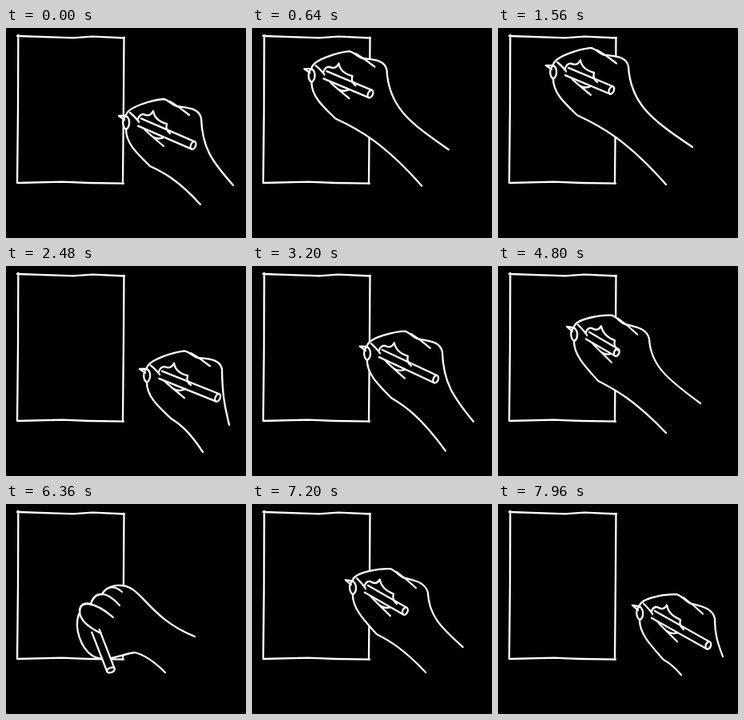
Write an HTML page that moves like this. It is 300 px wide and 263 px high and loops after 8000 ms.

```html
<!DOCTYPE html>
<html lang="en">
<head>
<meta charset="utf-8">
<title>Drawing hand</title>
<style>
html, body { margin: 0; width: 100%; height: 100%; overflow: hidden; background: #000; }
svg { display: block; width: 100%; height: 100%; }
path { fill: none; stroke: #fff; stroke-width: 2.3; stroke-linecap: round; stroke-linejoin: round; }
.solid { fill: #000; }
.mask { fill: #000; stroke: none; }
</style>
</head>
<body>
<svg viewBox="0 0 300 263">
  <path d="M14 10L84 12.3 108 10.7 148 12.5M147.5 12L147 90 146 195M14 194L70 192.7 104 194 147 194.7M15.3 9L15 100 14 194"/>
  <g id="hand"></g>
</svg>
<script>
const LOOP = 8000, STEP = 40;

// Where the nib is, how the hand leans, how far the pen shows, where the arm is cut
const pose = (x, y, lean, reach, top, low, shake = [2, 1, 160], fist = false) =>
  ({ x, y, lean, reach, top, low, shake, fist });

const start = pose(141, 110, 0, 1, [143, 87], [102, 111]);
const sketch = pose(60, 47, -0.02, 0.88, [183, 102], [150, 149], [3, 1, 160]);
const hover = pose(167, 129, -0.03, 1.05, [112, 70], [79, 104]);
const shade = pose(83, 55, 0.14, 0.97, [190, 133], [152, 174], [-4, 1, 160]);
const tilt = pose(86, 76, 0.12, 0.67, [167, 96], [124, 133]);
const grip = pose(92, 137, 0, 1, [144, 29], [107, 74], [-4, -48, 640], true);
const rest = pose(168, 127, 0.13, 1.02, [113, 64], [61, 87]);

// Each pose is held, with a shake, from one time to another
const holds = [
  [0, 0, start], [760, 1400, sketch], [1560, 1560, sketch], [2160, 2480, hover],
  [2880, 2880, hover], [3640, 4120, shade], [4480, 4800, tilt], [5080, 6520, grip],
  [6840, 7000, tilt], [7480, LOOP, rest]
];

const svgNS = 'http://www.w3.org/2000/svg';
const hand = document.getElementById('hand');
const layers = ['mask', 'line', 'line', 'mask', 'line', 'solid', 'line', 'line', 'solid'].map(kind => {
  const path = document.createElementNS(svgNS, 'path');
  path.setAttribute('class', kind);
  return hand.appendChild(path);
});

const mix = (a, b, k) => Array.isArray(a) ? a.map((v, i) => mix(v, b[i], k)) : a + (b - a) * k;
const bezier = ([first, ...rest]) => `M${first}C${rest.join(' ')}`;

function between(from, to, kx, ky) {
  return [mix(from[0], to[0], kx), mix(from[1], to[1], ky)];
}

function openHand({ lean, reach, top, low }) {
  const [end, cut] = [top, low].map(([x, y]) => [x, y - lean * x]);
  const heel = [39, 63], back = [103, 3];
  return {
    over: [[9, -1], [12, -12], [44, -20], [56, -21], [62, -20], [66, -14], [72, -12],
      [86, -10], [100, -10], back, between(back, end, 0.03, 0.45), between(back, end, 0.35, 0.65), end],
    under: [[9, 17], [9, 35], [24, 48], heel,
      between(heel, cut, 0.25, 0.15), between(heel, cut, 0.55, 0.35), cut],
    pen: [[26, 8], [93 * reach, 37 * reach]],
    thumb: 'M14 -4C24 4 28 12 34 19Q42 26 56 38M42 26Q50 31 58 26',
    creases: 'M64 -18Q76 -11 88 -1M24 4Q26 -2 31 -2Q39 2 43 -6Q45 6 60 10Q58 18 64 22',
    tip: 'M9 0c6 4 5 14 0 17c-5 -4 -5 -13 0 -17L0 0L7 5'
  };
}

function closedHand({ top, low }) {
  return {
    over: [[0, 0], [0, -12], [6, -14], [14, -12], [18, -24], [24, -24], [28, -24],
      [33, -33], [44, -36], [52, -35], [78, -34], [85, 5], top],
    under: [[-1, 1], [-7, 18], [1, 43], [16, 53], [33, 63], [51, 51], [69, 49], [82, 52], [95, 62], low],
    pen: [[20, 22], [39, 71]],
    thumb: '',
    creases: 'M27 25C10 17 0 8 0 -3C0 -16 18 -16 42 5M14 -12C18 -25 31 -32 50 -10M28 -24C34 -35 44 -35 53 -27',
    tip: ''
  };
}

function penPaths([from, to]) {
  const angle = Math.atan2(to[1] - from[1], to[0] - from[0]);
  const side = ([x, y], s) => [x - s * Math.sin(angle), y + s * Math.cos(angle)];
  const [a, b, c, d] = [side(from, -5), side(to, -5), side(to, 5), side(from, 5)];
  const arc = `A3 5 ${angle * 180 / Math.PI} 1 1 `;
  return {
    body: `M${a}L${b}L${c}L${d}Z`,
    edges: `M${a}L${b}M${d}L${c}`,
    cap: `M${b}${arc}${c}${arc}${b}Z`
  };
}

// A pose at a moment of its hold
function shaken([from, to, held], time) {
  const [sx, sy, period] = held.shake;
  const wave = Math.sin((Math.min(to, Math.max(from, time)) - from) / period * 2 * Math.PI);
  return { ...held, x: held.x + sx * wave, y: held.y + sy * wave };
}

function poseAt(time) {
  const i = holds.findLastIndex(hold => hold[0] <= time);
  const a = shaken(holds[i], time), next = holds[i + 1];
  if (time <= holds[i][1] || !next) return a;
  const b = shaken(next, time);
  const k = (time - holds[i][1]) / (next[0] - holds[i][1]), ease = k * k * (3 - 2 * k);
  const shape = k < 0.5 ? a : b;
  const moved = { ...shape, x: mix(a.x, b.x, ease), y: mix(a.y, b.y, ease) };
  if (a.fist === b.fist)
    for (const name of ['lean', 'reach', 'top', 'low']) moved[name] = mix(a[name], b[name], ease);
  return moved;
}

function draw(time) {
  const now = poseAt(time);
  const { over, under, pen, thumb, creases, tip } = now.fist ? closedHand(now) : openHand(now);
  const { body, edges, cap } = penPaths(pen);
  const silhouette = bezier(over) + bezier([...under].reverse()).replace('M', 'L') + 'Z';
  hand.setAttribute('transform', `matrix(1 ${now.lean} 0 1 ${now.x} ${now.y})`);
  [silhouette, bezier(under), thumb, body, edges, cap, bezier(over), creases, tip]
    .forEach((d, i) => layers[i].setAttribute('d', d));
}

const begin = performance.now();
function tick() {
  const time = (performance.now() - begin) % LOOP;
  draw(Math.floor(time / STEP) * STEP);
  requestAnimationFrame(tick);
}
tick();
</script>
</body>
</html>
```
